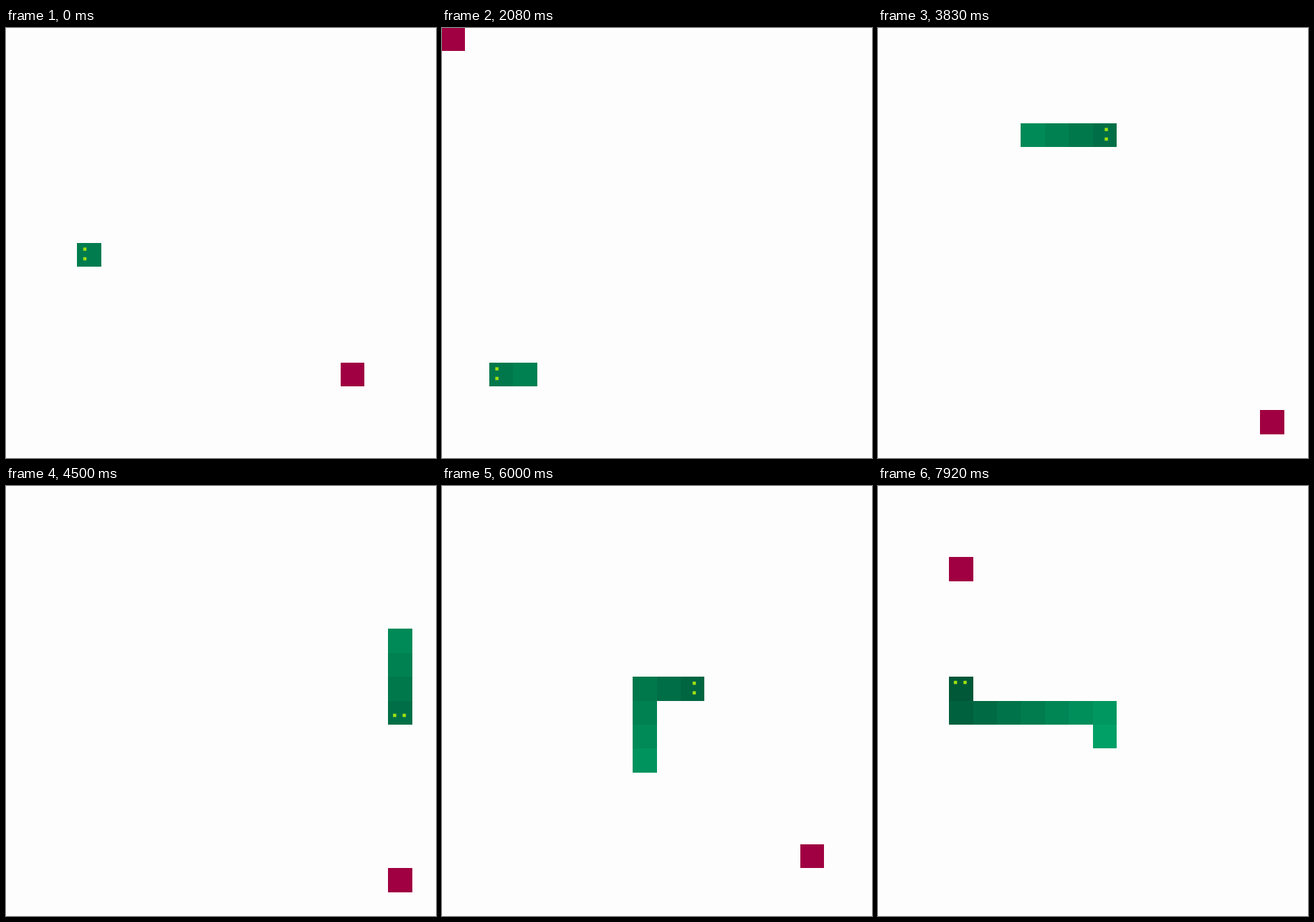
Animation of 600x600 px, one loop 8000 ms. Source, as an HTML page:

```html
<!DOCTYPE html>
<html lang="en">
<head>
<meta charset="utf-8">
<title>Snake</title>
<style>
  html, body { margin: 0; width: 100%; height: 100%; overflow: hidden; background: #fefdfe; }
  svg { display: block; width: 100%; height: 100%; }
</style>
</head>
<body>
<svg id="stage" viewBox="0 0 600 600"></svg>
<script>
const LOOP = 8000, TICK = 1000 / 12, MOVE = 60;
const CELL = 33.4, EYE = 4.5;
const DIRS = { L: [-1, 0], R: [1, 0], U: [0, -1], D: [0, 1] };
const ROUTE = 'L3 D2 R14 D3 L14 U14 R4 D4 R12 D12 L8 U8 R7 D7 L4 U4 L2 U2 L6 U1';
const MEALS = [22, 50, 58, 82, 98, 112, 120, 124];
const LAST_FOOD = { x: 3, y: 3 };
// Eye centres within the head cell
const EYES = {
  L: [[10.8, 9], [10.8, 22.4]],
  R: [[19, 9], [19, 22.4]],
  U: [[8.9, 7.9], [22.3, 7.9]],
  D: [[8.9, 20.5], [22.3, 20.5]]
};

const path = [{ x: 3, y: 9, dir: 'L' }];
for (const leg of ROUTE.split(' ')) {
  const dir = leg[0], [dx, dy] = DIRS[dir];
  for (let n = +leg.slice(1); n > 0; n--) {
    const { x, y } = path[path.length - 1];
    path.push({ x: x + dx, y: y + dy, dir });
  }
}

const stage = document.getElementById('stage');
const edge = c => Math.round(c * CELL - 1);
const rect = (x, y, w, h, fill) =>
  `<rect x="${x}" y="${y}" width="${w}" height="${h}" fill="${fill}"/>`;
const block = ({ x, y }, fill) =>
  rect(edge(x), edge(y), edge(x + 1) - edge(x), edge(y + 1) - edge(y), fill);

// Head darkens and tail brightens as the snake grows
function shade(i, length) {
  const g = 124 + 9 * (i - (length - 1) / 2);
  return `rgb(0,${Math.round(g)},${Math.round(g * 0.64)})`;
}

function draw(time) {
  // Ticks fall on whole hundredths of a second
  const tick = Math.floor((Math.floor(time / 10) * 10 + 5) / TICK);
  const move = Math.min(path.length - 1, Math.floor(tick * TICK / MOVE + 1e-6));
  const eaten = MEALS.filter(m => m <= move).length;
  const length = eaten + 1;
  const head = path[move];
  let out = block(eaten < MEALS.length ? path[MEALS[eaten]] : LAST_FOOD, '#a00041');
  for (let i = length - 1; i >= 0; i--) {
    if (move >= i) out += block(path[move - i], shade(i, length));
  }
  for (const [ex, ey] of EYES[head.dir]) {
    out += rect(head.x * CELL - 1 + ex - EYE / 2, head.y * CELL - 1 + ey - EYE / 2, EYE, EYE, '#a0e010');
  }
  stage.innerHTML = out;
}

const start = performance.now();
function frame() {
  draw((performance.now() - start) % LOOP);
  requestAnimationFrame(frame);
}
frame();
</script>
</body>
</html>
```
